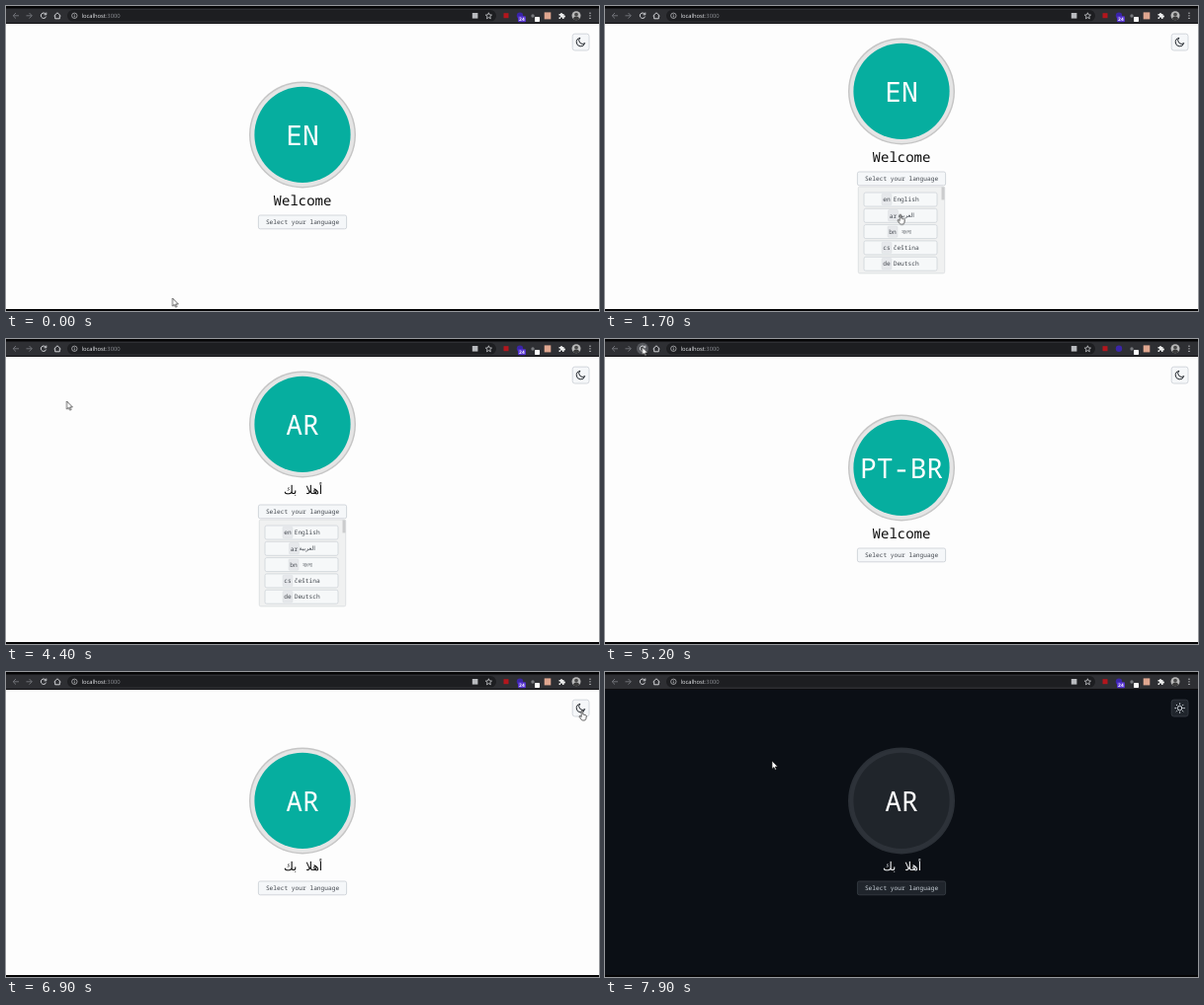
These frames come from a looping animation (600x309 px, 8000 ms). An HTML page:

```html
<!DOCTYPE html>
<html lang="en">
<head>
<meta charset="utf-8">
<title>Language picker</title>
<style>
  html, body { margin: 0; width: 100%; height: 100%; overflow: hidden; background: #000; }
  svg { display: block; width: 600px; height: 309px; text-rendering: geometricPrecision; }
  text { font-family: "Noto Sans Mono", "DejaVu Sans Mono", monospace; }

  #stage, #stage .anim { animation: 8s step-end infinite; }
  #stage { animation-name: theme; }

  .page { fill: var(--page); }
  .rim { fill: var(--rim); }
  .ring { fill: var(--ring); }
  .disc { fill: var(--disc); }
  .button { fill: var(--button); stroke: var(--edge); stroke-width: .9; }
  .code { font-size: 28px; fill: #fff; text-anchor: middle; }
  .hello { font-size: 14px; fill: var(--ink); text-anchor: middle; }
  .arabic { font-family: "DejaVu Sans", "Noto Sans", sans-serif; font-size: 12px; word-spacing: 5px; }
  .label { font-size: 6.2px; fill: var(--soft); }
  .mid { text-anchor: middle; }
  .native { font-family: "Noto Sans", "DejaVu Sans", sans-serif; font-size: 6px; }
  .tag { fill: #e6e8eb; stroke: #d5d8dc; stroke-width: .4; }
  .url { font: 5.8px "Open Sans", "Noto Sans", sans-serif; fill: #e8eaed; }
  .line { fill: none; stroke: #e4e5e8; stroke-width: .9; }
  .dim { stroke: #77797e; }
  .glyph { fill: none; stroke: var(--icon); stroke-width: 1; stroke-linecap: round; stroke-linejoin: round; }
  .pointer { fill: #fff; stroke: #111; stroke-width: .65; stroke-linejoin: round; }

  #stage .content { animation-name: lift; }
  #stage .menu { animation-name: menu; }
  #stage .en { animation-name: en; }
  #stage .pt { animation-name: pt; }
  #stage .ar { animation-name: ar; }
  #stage .welcome { animation-name: welcome; }
  #stage .moon { animation-name: moon; }
  #stage .sun { animation-name: sun; }
  #stage .badge { animation-name: badge; }
  #stage .hover { animation-name: hover; }
  #stage .hand { animation-name: hand; }
  #stage .arrow { animation-name: arrow; }
  #stage .cursor { animation-name: travel; }

  @keyframes theme {
    0% { --page: #fdfdfd; --rim: #c6c6c6; --ring: #e5e5e5; --disc: #06ae9f; --button: #f5f7f9;
         --edge: #cfd3d8; --ink: #0c0c0c; --soft: #42474e; --icon: #24292f; }
    87.5%, 100% { --page: #0b0f15; --rim: #2b3037; --ring: #2d3239; --disc: #20252b; --button: #20252c;
         --edge: #363b43; --ink: #f4f5f6; --soft: #c9d1d9; --icon: #d3d9df; }
  }
  @keyframes lift {
    0%, 65%, 100% { transform: none; }
    13.75% { transform: translateY(-44px); }
  }
  @keyframes menu { 0%, 65%, 100% { visibility: hidden; } 13.75% { visibility: visible; } }
  @keyframes en { 0% { visibility: visible; } 32.5%, 100% { visibility: hidden; } }
  @keyframes pt { 0%, 70%, 100% { visibility: hidden; } 65% { visibility: visible; } }
  @keyframes ar { 0%, 65% { visibility: hidden; } 32.5%, 70%, 100% { visibility: visible; } }
  @keyframes welcome { 0%, 65% { visibility: visible; } 32.5%, 70%, 100% { visibility: hidden; } }
  @keyframes moon { 0% { visibility: visible; } 87.5%, 100% { visibility: hidden; } }
  @keyframes sun { 0% { visibility: hidden; } 87.5%, 100% { visibility: visible; } }
  @keyframes badge { 0%, 71.25%, 100% { visibility: visible; } 65% { visibility: hidden; } }
  @keyframes hover { 0%, 68.75%, 100% { visibility: hidden; } 61.25% { visibility: visible; } }
  @keyframes hand { 0%, 43.75%, 91.25%, 100% { visibility: hidden; } 17.5%, 86.25% { visibility: visible; } }
  @keyframes arrow { 0%, 43.75%, 91.25%, 100% { visibility: visible; } 17.5%, 86.25% { visibility: hidden; } }

  /* The pointer advances ten times a second. */
  @keyframes travel {
    0% { transform: translate(168.5px, 296px); }
    1.25% { transform: translate(168.5px, 296px); animation-timing-function: steps(4, start); }
    6.25% { transform: translate(250px, 252px); animation-timing-function: steps(5, start); }
    12.5% { transform: translate(304px, 220px); }
    16.25% { transform: translate(304px, 220px); animation-timing-function: steps(6, start); }
    23.75% { transform: translate(298px, 209.5px); }
    40% { transform: translate(298px, 209.5px); animation-timing-function: steps(3, start); }
    43.75% { transform: translate(315px, 195px); animation-timing-function: steps(3, start); }
    47.5% { transform: translate(309px, 180px); }
    51.25% { transform: translate(309px, 180px); animation-timing-function: steps(4, start); }
    56.25% { transform: translate(61.5px, 63px); animation-timing-function: steps(5, start); }
    62.5% { transform: translate(37.5px, 8px); }
    68.75% { transform: translate(37.5px, 8px); animation-timing-function: steps(6, start); }
    76.25% { transform: translate(266px, 168px); animation-timing-function: steps(9, start); }
    87.5% { transform: translate(583px, 39px); }
    91.25% { transform: translate(583px, 39px); animation-timing-function: steps(7, start); }
    100% { transform: translate(169px, 90px); }
  }
</style>
</head>
<body>
<svg id="stage" viewBox="0 0 600 309">
  <defs>
    <rect id="row" x="262" y="-7" width="74" height="14" rx="1.8" fill="#f6f8f9" stroke="#cfd3d8" stroke-width=".8"/>
    <rect id="tag" x="-5" y="-5.7" width="10" height="11.4" rx="1.2" class="tag"/>
  </defs>

  <rect width="600" height="309" fill="#050506"/>
  <rect class="page" y="18" width="600" height="289"/>

  <!-- Browser bar -->
  <rect y="2.5" width="600" height="14.7" fill="#2e2f33"/>
  <rect x="62" y="4" width="434" height="11.6" rx="5.8" fill="#1d1e21"/>
  <circle class="anim hover" cx="38" cy="9.8" r="6" fill="#55575c"/>
  <g class="line">
    <path class="dim" d="M13 9.8H7.3M10 7L7.2 9.8L10 12.6M20.5 9.8H26.2M23.5 7L26.3 9.8L23.5 12.6"/>
    <path d="M40.2 8.1A2.7 2.7 0 1 0 40.6 10.6M40.8 6.6V8.8H38.5"/>
    <path d="M48.6 10L52 6.8L55.4 10M49.7 9.4V12.8H54.3V9.4"/>
    <circle cx="69.3" cy="9.8" r="2.7" stroke-width=".6"/>
    <path d="M69.3 9.4V11.4M69.3 8V8.6" stroke-width=".7"/>
    <path d="M488.4 6.8L489.3 8.9L491.5 9.1L489.8 10.6L490.3 12.8L488.4 11.6L486.5 12.8L487 10.6L485.3 9.1L487.5 8.9Z" stroke-width=".7"/>
  </g>
  <text class="url" x="76.5" y="11.9">localhost<tspan fill="#8d9095">:3000</tspan></text>
  <rect x="471.8" y="7" width="5.6" height="5.6" fill="#b9bbbf"/>
  <rect x="503.5" y="7.2" width="5" height="5" fill="#b3161d"/>
  <circle cx="520" cy="9.8" r="3.2" fill="#3a25a8"/>
  <g class="anim badge">
    <rect x="518" y="10.2" width="8" height="6" rx="1" fill="#5532cf"/>
    <text x="522" y="15" font-size="4.8" font-weight="700" fill="#fff" class="mid">24</text>
  </g>
  <circle cx="533" cy="10" r="1.7" fill="#77797e"/>
  <rect x="535" y="11" width="5" height="5" rx=".7" fill="#fff"/>
  <rect x="544.7" y="6.4" width="6.6" height="7" fill="#dfa68f"/>
  <path d="M559.5 8H561A1 1 0 1 1 563 8H564.5V9.6A1 1 0 1 1 564.5 11.4V13H562.9A1 1 0 1 0 561.1 13H559.5V11.3A1 1 0 1 0 559.5 9.6Z" fill="#eceded"/>
  <circle cx="577" cy="9.8" r="4.5" fill="#b8b8b8"/>
  <path d="M573.8 13A3.3 3.3 0 0 1 580.2 13A4.5 4.5 0 0 1 573.8 13Z" fill="#3a3a3a"/>
  <circle cx="577" cy="8.6" r="1.9" fill="#4a4a4a"/>
  <path d="M591 7.2V13" stroke="#e4e5e8" stroke-width="1.3" stroke-linecap="round" stroke-dasharray="0 2.6"/>

  <!-- Theme switch -->
  <rect class="button" x="573.2" y="28.2" width="16.8" height="16.8" rx="2.4"/>
  <path class="glyph anim moon" d="M580.5 32.4A4.3 4.3 0 1 0 585.7 37.6A3.7 3.7 0 0 1 580.5 32.4Z"/>
  <g class="glyph anim sun" transform="translate(581.6 36.6)" stroke-width=".8">
    <circle r="2.3"/>
    <path d="M0-4.8V-4M0 4V4.8M-4.8 0H-4M4 0H4.8M-3.4-3.4L-2.9-2.9M2.9 2.9L3.4 3.4M-3.4 3.4L-2.9 2.9M2.9-2.9L3.4-3.4"/>
  </g>

  <!-- Greeting -->
  <g class="anim content">
    <circle class="rim" cx="300" cy="130.4" r="54"/>
    <circle class="ring" cx="300" cy="130.4" r="52.5"/>
    <circle class="disc" cx="300" cy="130.4" r="48.6"/>
    <text class="code anim en" x="300" y="141.2">EN</text>
    <text class="code anim pt" x="300" y="141.2">PT-BR</text>
    <text class="code anim ar" x="300" y="141.2">AR</text>
    <text class="hello anim welcome" x="300" y="202.4">Welcome</text>
    <text class="hello arabic anim ar" x="300.5" y="201">أهلا بك</text>
    <rect class="button" x="255.4" y="212" width="89.2" height="13.8" rx="1.8"/>
    <text class="label mid" x="300" y="221">Select your language</text>
  </g>

  <!-- Language list -->
  <g class="anim menu">
    <rect x="256.3" y="183" width="87.4" height="87.8" rx="1.5" fill="#f0f1f1" stroke="#d9dbdd" stroke-width=".8"/>
    <rect x="340.5" y="183.4" width="3" height="13" fill="#cbcccd"/>
    <g transform="translate(0 196)">
      <use href="#row"/><use href="#tag" x="285"/>
      <text class="label mid" x="285" y="2.2">en</text><text class="label" x="291.7" y="2.2">English</text>
    </g>
    <g transform="translate(0 212.3)">
      <use href="#row"/><use href="#tag" x="291.5"/>
      <text class="label mid" x="291.5" y="2.2">ar</text><text class="label native mid" x="304.8" y="1.8">العربية</text>
    </g>
    <g transform="translate(0 228.6)">
      <use href="#row"/><use href="#tag" x="291"/>
      <text class="label mid" x="291" y="2.2">bn</text><text class="label native mid" x="305" y="2.2">বাংলা</text>
    </g>
    <g transform="translate(0 244.9)">
      <use href="#row"/><use href="#tag" x="285"/>
      <text class="label mid" x="285" y="2.2">cs</text><text class="label" x="291.7" y="2.2">čeština</text>
    </g>
    <g transform="translate(0 261.2)">
      <use href="#row"/><use href="#tag" x="285"/>
      <text class="label mid" x="285" y="2.2">de</text><text class="label" x="291.7" y="2.2">Deutsch</text>
    </g>
  </g>

  <g class="anim cursor">
    <path class="pointer anim arrow" d="M0 0V8.2L1.9 6.5L3.2 9.2L4.4 8.6L3.2 6H5.8Z"/>
    <path class="pointer anim hand" d="M-.8 .8A.8 .8 0 0 1 .8 .8V4L3.4 4.6Q4.4 4.9 4.3 5.9L3.8 8.5Q3.5 10 2.1 10H.6Q-.3 10-.9 9.1L-2.9 6.3Q-3 5.4-2 5.5L-.8 6.5Z"/>
  </g>
</svg>
</body>
</html>
```
